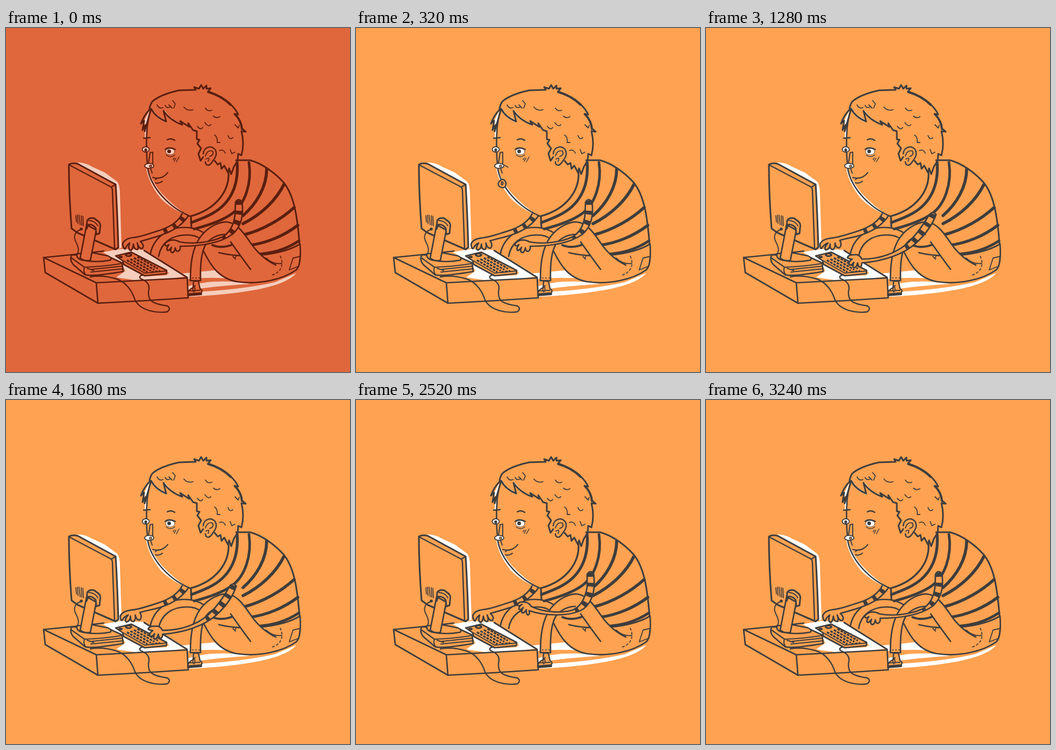
Write an HTML page with a canvas that moves like this. It is 640 px wide and 640 px high and loops after 3.4 s.

```html
<!DOCTYPE html>
<html lang="en">
<head>
<meta charset="utf-8">
<title>At the computer</title>
<style>
html, body { margin: 0; width: 100%; height: 100%; overflow: hidden; background: #ffa251; }
canvas { display: block; width: 100vmin; height: 100vmin; }
</style>
</head>
<body>
<canvas id="stage" width="640" height="640"></canvas>
<script>
const ctx = document.getElementById('stage').getContext('2d');
const LOOP = 3400, STEP = 40;
const FLASH = { bg: '#df673b', ink: '#5a1f10', light: '#f5cdbd' };
const NORMAL = { bg: '#ffa251', ink: '#3d3d3d', light: '#ffffff' };
let pal = NORMAL;

ctx.lineCap = ctx.lineJoin = 'round';

function fill(d, color = pal.bg) {
  ctx.fillStyle = color;
  ctx.fill(new Path2D(d));
}
function line(d, width = 2.7, dash = []) {
  ctx.strokeStyle = pal.ink;
  ctx.lineWidth = width;
  ctx.setLineDash(dash);
  ctx.lineCap = dash.length ? 'butt' : 'round';
  ctx.stroke(new Path2D(d));
}
function shape(d, width, color) {
  fill(d, color);
  line(d, width);
}
function oval(x, y, rx, ry, color, width = 0) {
  ctx.beginPath();
  ctx.ellipse(x, y, rx, ry, 0, 0, 7);
  ctx.fillStyle = color;
  ctx.fill();
  if (!width) return;
  ctx.setLineDash([]);
  ctx.strokeStyle = pal.ink;
  ctx.lineWidth = width;
  ctx.stroke();
}
// An outlined arm whose sleeve bands stay inside the outline.
function arm(outline, sleeve, bands) {
  fill(outline);
  ctx.save();
  ctx.clip(new Path2D(outline));
  line(sleeve, 20, bands);
  ctx.restore();
  line(outline);
}

// Blend two paths that share the same commands.
function mix(a, b, k) {
  const ends = b.match(/[\d.]+/g);
  let i = 0;
  return a.replace(/[\d.]+/g, v => (v * (1 - k) + ends[i++] * k).toFixed(2));
}
function ease(t, a, b) {
  const k = Math.min(1, Math.max(0, (t - a) / (b - a)));
  return k * k * (3 - 2 * k);
}
function taps(t, a, b, count) {
  return t > a && t < b ? Math.sin(Math.PI * count * (t - a) / (b - a)) ** 2 : 0;
}

const RIGHT = {
  rest: 'M427 324Q432 315 439 323C442 345 440 368 421 384C400 399 365 406 324 406' +
    'Q325 412 321 415Q316 417 315 409Q314 416 310 418Q304 417 308 408Q305 413 301 414' +
    'Q297 412 303 403Q298 407 296 404Q294 400 303 396Q312 392 323 398' +
    'C350 403 382 398 402 389C418 380 424 365 426 348Z',
  key: 'M415 348Q422 339 428 347C422 365 408 384 391 400C368 421 330 434 290 437' +
    'Q290 444 286 445Q283 443 282 437Q280 446 275 446Q272 444 275 436Q270 443 266 440' +
    'Q265 434 272 430Q266 430 263 427Q266 421 276 422Q285 420 290 430' +
    'C325 430 354 418 373 402C389 388 403 368 415 348Z',
  lift: 'M430 324Q436 315 442 323C445 345 444 372 424 388C400 404 352 402 322 392' +
    'Q324 399 320 400Q316 398 317 390Q313 397 309 396Q307 393 311 386Q306 392 303 389' +
    'Q303 384 309 380Q302 385 300 381Q303 374 313 376Q321 376 326 384' +
    'C350 396 386 397 405 390C421 382 427 365 430 348Z'
};
const SLEEVE = {
  rest: 'M433 321C435 345 431 370 412 386C400 394 385 399 370 400',
  key: 'M421 345C412 366 398 383 382 401C372 410 362 415 350 420',
  lift: 'M436 321C438 345 435 372 415 389C402 396 388 399 372 399'
};
const LEFT = {
  far: 'M329 343C322 360 305 371 281 378C262 384 250 389 236 390Q220 392 217 402' +
    'Q219 412 222 411Q224 404 230 400Q226 412 232 414Q236 412 237 402Q238 413 245 412' +
    'Q247 408 244 400Q248 412 254 410Q258 404 250 397C268 392 282 388 292 384C312 377 328 366 339 350',
  near: 'M329 343C322 360 305 371 279 379C260 385 246 390 232 391Q216 393 212 402' +
    'Q212 411 215 410Q220 402 227 400Q218 410 223 413Q230 412 231 402Q230 413 237 412' +
    'Q241 408 240 400Q242 410 248 409Q254 404 249 395C268 390 282 388 292 384C312 377 328 366 339 350'
};

function floor() {
  fill('M325 457L396 450 412 466Q380 463 338 467Z', pal.light);
  fill('M338 481Q370 469 425 472L455 476Q400 479 338 488Z', pal.light);
  fill('M338 492Q440 487 500 473L540 456Q520 480 440 491Q400 497 340 500Z', pal.light);
}

function desk() {
  fill('M180 417L214 411 257 413 337 462 300 467 240 469 205 464 222 452 215 438Z', pal.light);
  line('M182 415L130 421 70 427 73 455 171 512Q255 508 339 502L337 464 257 414');
  line('M70 427L168 474 337 465M168 474L171 512');
  line('M157 463C172 460 190 462 206 467C224 473 235 490 240 506C250 526 280 531 300 528' +
    'Q308 522 300 517C272 513 264 508 265 490C270 475 258 469 250 466Q246 461 256 459', 2.4);
}

function monitor() {
  fill('M132 250Q147 250 160 258L184 269 207 286Q212 292 212 310L215 409 205 411 203 292Z', pal.light);
  shape('M117 254Q124 250 134 253L204 291Q207 340 209 408L204 412 133 381 122 373Q117 310 117 254Z', 3.1);
  line('M118 255L194 295Q198 297 198 302L202 410M196 296L204 291', 2.5);
  line('M130 349L131 361M133 348L134 364M136 348L138 366M140 349L141 367M143 350L144 368', 1.7);
}

function books() {
  shape('M122 422Q118 432 125 440L147 459Q160 463 218 453L216 437 190 425Z', 2.6);
  line('M122 428L146 445Q180 444 217 438M146 445Q143 452 148 459M160 449L217 443M158 454L218 448M151 447L163 451', 2.2);
  shape('M132 420Q130 429 142 432Q168 437 194 432Q198 428 190 424L160 418Z', 2.5);
  shape('M150 366L138 428Q147 435 157 432L168 376Z', 2.7);
  shape('M150 374L151 358Q155 352 164 354L172 360Q177 364 175 372L174 382 168 384 167 372Q160 364 153 366Z', 2.9);
  line('M154 358Q166 359 171 368', 2);
  line('M139 375C128 379 124 388 131 400C138 414 134 421 128 422', 2);
  oval(140, 374, 2.8, 2.8, pal.ink);
}

function keyboard() {
  fill('M262 462L298 460 303 456 298 450Z');
  shape('M204 424L233 417 299 451 298 457 258 461 219 440 217 433Z', 2.6);
  line('M218 433L258 456 299 452', 2);
  oval(213, 426, 4, 2.5, pal.ink);
  oval(228, 422, 7, 4, pal.ink);
  oval(228, 422, 3, 1, pal.bg);
  for (let row = 0; row < 4; row++) {
    const x = row * 6.5, y = -row * 2.1;
    line(`M${225 + x} ${432 + y}L${263 + x} ${454 + y}`, 3.3, [5, 1.8]);
  }
  line('M270 454L287 452', 3, [5, 2]);
}

function backLeg() {
  line('M268 424C272 394 297 371 332 371C350 371 363 377 372 384');
  line('M284 425C288 400 308 385 336 385C350 385 358 389 362 393');
}

function leftArm(t) {
  const reach = t < 560 ? 0.6 * ease(t, 40, 280) + 0.4 * ease(t, 360, 560) : 1 - ease(t, 2280, 2480);
  const tap = taps(t, 560, 720, 1) + taps(t, 720, 1280, 2) + taps(t, 1280, 2160, 4);
  const idle = taps(t, 2880, 3240, 2);
  const outline = mix(LEFT.far, LEFT.near, reach - 0.4 * tap + 0.4 * idle);
  arm(outline, 'M329 352C321 364 305 374 280 383', [7, 12, 7, 12, 7, 99]);
}

function body() {
  line('M428 246L454 246C477 252 501 270 517 288C536 312 542 350 546 401', 3);
  line('M414 268C416 302 392 337 344 350L345 372', 3.2);
  line('M430 250C433 290 420 325 384 345C372 352 358 357 345 362', 5.2);
  line('M452 250C458 290 444 328 421 345C402 359 373 368 350 374', 4.8);
  line('M485 262C485 296 466 327 441 349', 5.6);
  line('M517 291C503 320 475 347 441 364', 5.6);
  line('M536 334C513 355 480 375 442 385', 5.6);
  line('M543 367C518 386 486 400 454 404', 5.4);
  line('M545 396C518 414 490 420 464 421', 5);
  line('M384 404C396 409 410 408 424 402', 4);
  const seat = 'M368 416C380 440 395 466 430 472C470 478 515 468 540 450Q550 440 547 402';
  fill(seat + 'C510 424 440 429 396 420Z');
  line(seat);
  line('M547 402C510 424 440 429 396 418');
  line('M534 428L547 425 545 443 527 450Z', 1.8);
  line('M510 424C518 440 512 455 494 460', 1.7, [5, 3]);
  line('M422 425L427 430M428 424L426 429M484 428Q496 440 513 438', 1.8);
}

function frontLeg() {
  const top = 'M343 470C343 440 346 410 362 388C378 368 398 360 412 361C432 364 445 385 458 404C470 420 485 433 502 441';
  fill(top + 'L470 455 455 449C442 432 430 415 418 398L408 384C395 384 380 391 372 402C364 415 361 440 362 470Z');
  line(top);
  line('M343 470L362 470C361 440 364 415 372 402C380 391 394 384 408 384M418 398C430 415 442 432 455 449');
  line('M346 465L361 465', 1.5, [3, 3]);
  shape('M349 471L348 483Q339 487 338 495L363 493Q367 488 361 485L358 471Z', 2.4);
  line('M339 497L363 495', 4);
  line('M340 489L361 488M348 480Q353 481 351 490M352 479Q345 484 349 491', 1.9);
}

function rightArm(t) {
  let from = 'rest', to = 'key', k = ease(t, 1120, 1260);
  if (t >= 2520) { from = 'lift'; to = 'rest'; k = ease(t, 2520, 2760); }
  else if (t >= 2280) { from = 'key'; to = 'lift'; k = ease(t, 2280, 2500); }
  else k -= 0.14 * taps(t, 1280, 2160, 4);
  arm(mix(RIGHT[from], RIGHT[to], k), mix(SLEEVE[from], SLEEVE[to], k),
    [8, 11, 7, 11, 8, 11, 8, 11, 7, 99]);
}

function pouting(t) {
  return t >= 160 && t < 580;
}
function mouth(t) {
  if (pouting(t)) {
    shape('M266 294Q263 290 267 285Q272 279 277 284Q281 290 277 296Q271 299 266 294Z', 2.4);
    line('M271 286Q275 286 273 291Q269 294 271 286', 2);
  } else if (t >= 580 && t < 1140) {
    line('M275 281Q284 276 293 277Q297 287 287 290Q278 291 277 281M284 296Q288 298 292 295', 2.3);
  } else {
    line('M273 278Q290 283 301 269M278 282L282 279M278 288Q285 290 291 285', 2.1);
  }
}

function face(t) {
  fill('M266 160L259 182 258 205 262 205 264 180Z', pal.light);
  fill('M261 262Q266 290 288 317Q306 336 340 350Q310 330 290 308Q270 284 265 262Z', pal.light);
  line('M265 168C261 190 261 210 262 240L264 263C270 295 300 332 342 350', 2.6);
  line('M256 205L268 204M300 208Q307 204 314 209', 2.3);
  oval(260, 226, 6.5, 5, pal.light, 1.8);
  oval(260, 227, 2.7, 2.9, pal.ink);
  oval(305.5, 230, 8.5, 6, pal.light, 0.8);
  line('M296 226Q303 220 315 226', 2.3);
  oval(303.5, 229.5, 3.5, 3.5, pal.ink);
  line('M298 236Q306 243 314 236M313 248L316 242M317 249L322 240M311 245L313 242', 1.5);
  line('M268 232L265 253M273 231L273 256M268 232L273 231M269 261L272 270', 2);
  oval(266.5, 256.5, 8.5, 4.6, pal.light, 1.9);
  oval(269, 257, 2, 2, pal.bg, 1.5);
  if (pouting(t)) line('M276 255L283 259', 1.5);
  mouth(t);
}

function hair() {
  fill('M267 153L258 171 258 180 262 178ZM269 150Q277 168 298 176L294 170Q278 163 271 148ZM293 154Q306 173 328 181L326 177Q308 172 296 154Z', pal.light);
  line('M258 192L260 180 254 190 257 172 251 178Q257 162 267 152Q267 145 272 137Q286 124 322 116L353 115 350 110' +
    'L359 113 363 106 367 113 373 107 373 113 381 112 376 118Q405 129 418 142Q428 152 432 161L425 160' +
    'Q438 172 439 187L446 193 438 192Q444 215 438 237L432 234 431 247 424 258 419 272 415 261 413 269' +
    'L406 256 401 262 399 251 394 254 388 247', 3);
  line('M258 192L265 168 270 150Q278 166 298 174L293 154Q305 172 328 180L324 173 341 184 339 177' +
    'L348 190 355 192 355 207 360 208 356 215 363 224 358 234 362 247 367 240', 3);
  line('M376 119Q401 126 418 143M426 160Q438 173 439 188', 4);
  line('M296 144Q299 150 305 147M303 143L309 149M310 135L315 141 312 149M331 147Q337 155 348 152' +
    'M371 149Q375 156 383 153M386 164Q391 169 398 165M356 183Q362 191 366 185M370 176Q376 185 381 180' +
    'M388 199Q394 203 393 213L398 213M413 200Q416 209 422 204M426 180L432 186 434 181' +
    'M397 228Q405 225 408 233M417 226L420 234 426 231M281 143Q285 151 292 148', 1.8);
  shape('M367 234C368 220 385 217 390 228C394 238 386 245 383 250C378 258 371 256 371 249', 2.5);
  line('M371 238Q375 226 384 229Q388 236 379 239M372 244Q380 239 376 248', 1.9);
}

function draw(now) {
  const t = Math.floor(now % LOOP / STEP) * STEP;
  pal = t < STEP ? FLASH : NORMAL;
  document.body.style.background = pal.bg;
  ctx.fillStyle = pal.bg;
  ctx.fillRect(0, 0, 640, 640);
  floor();
  backLeg();
  desk();
  monitor();
  books();
  keyboard();
  leftArm(t);
  body();
  frontLeg();
  face(t);
  hair();
  rightArm(t);
}

const start = performance.now();
function tick() {
  draw(performance.now() - start);
  requestAnimationFrame(tick);
}
tick();
</script>
</body>
</html>
```
